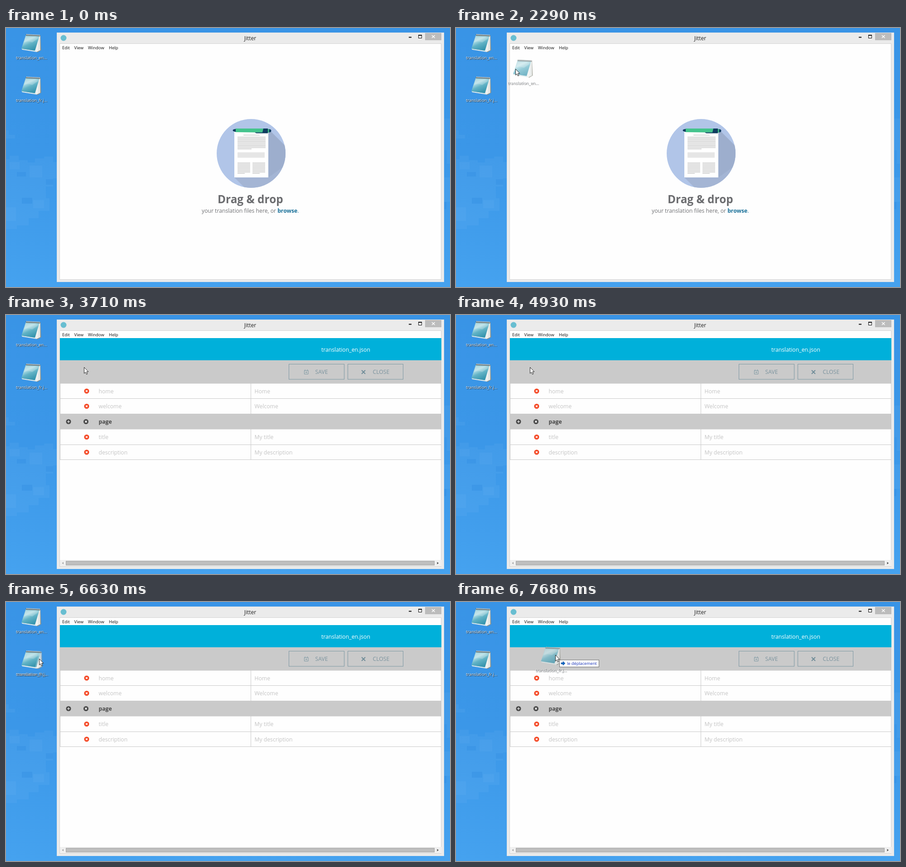
These frames come from a looping animation (980 by 572 pixels, 8000 ms). An HTML page:

```html
<!DOCTYPE html>
<html lang="en">
<head>
<meta charset="utf-8">
<title>Drag and drop</title>
<style>
html, body { margin: 0; width: 100%; height: 100%; overflow: hidden; background: #3f9aea; }
svg { display: block; font-family: "Open Sans", "Noto Sans", sans-serif; }
text { white-space: pre; }
</style>
</head>
<body>
<svg id="stage" width="980" height="572" viewBox="0 0 980 572" xmlns="http://www.w3.org/2000/svg">
<defs>
  <linearGradient id="sky" x2="0" y2="1">
    <stop stop-color="#3994e6"/><stop offset=".5" stop-color="#3b97e8"/><stop offset="1" stop-color="#45a2ef"/>
  </linearGradient>
  <linearGradient id="cover" x1="0" y1="0" x2=".5" y2="1">
    <stop stop-color="#8cc3ce"/><stop offset=".4" stop-color="#b5dfe6"/><stop offset=".65" stop-color="#62b3c6"/><stop offset="1" stop-color="#3795ae"/>
  </linearGradient>
  <clipPath id="disc"><circle cx="541" cy="277" r="76"/></clipPath>
  <clipPath id="view"><rect x="119" y="35" width="842" height="520"/></clipPath>
  <g id="pad">
    <path d="M46 14L76 16 77.500 49 69 54Z" fill="#8d8f83"/>
    <path d="M72 18L75.500 18 75.500 49 67 53 62 49Z" fill="#eef1f0"/>
    <path d="M73 24L72 50M75 20V49" stroke="#c3cac9" stroke-width=".7"/>
    <path d="M34 45.500L64 50 67.500 53 36 48Z" fill="#dce8ea"/>
    <path d="M44 15L74 17 64 50 34 45.500Z" fill="url(#cover)"/>
    <path d="M43 19L72 22 58 32Q48 27 41 32Z" fill="#fff" opacity=".2"/>
    <path d="M44 15.500L75 17" stroke="#59686c" stroke-width="3"/>
    <path d="M45 14.500L75 16" stroke="#dadfdd" stroke-width="2.500" stroke-dasharray="1.500 1.300"/>
  </g>
  <g id="cross"><circle r="5.500"/><path d="M-2 -2L2 2M2 -2L-2 2" stroke="#fff" stroke-width="1.700"/></g>
</defs>

<rect width="980" height="572" fill="url(#sky)"/>
<g id="blocks" fill="#fff"></g>
<g id="icons"></g>

<rect x="112" y="10" width="855" height="551" fill="#ebebeb"/>
<rect x="112.500" y="10.500" width="854" height="550" fill="none" stroke="#dfe3e7"/>
<rect x="118.500" y="34.500" width="842" height="521" fill="#fefefe" stroke="#d3d3d3"/>
<circle cx="127" cy="22" r="6.500" fill="#68bed1"/>
<text x="539" y="27" font-size="12" text-anchor="middle" fill="#222">Jitter</text>
<path d="M889 20.500H895" stroke="#111" stroke-width="2"/>
<path d="M910.500 16V22.500H917.500V16" fill="none" stroke="#111"/><path d="M910 16H918" stroke="#111" stroke-width="2"/>
<rect x="925" y="11" width="36" height="16" fill="#bcbcbc"/>
<path d="M940 16L946.500 22M946.500 16L940 22" stroke="#fff" stroke-width="1.500"/>
<g font-size="9.500" fill="#111">
  <text x="124" y="46.500">Edit</text><text x="150.500" y="46.500">View</text>
  <text x="181" y="46.500">Window</text><text x="227" y="46.500">Help</text>
</g>

<g id="drop">
  <circle cx="541" cy="277" r="76" fill="#b1c5e8"/>
  <g clip-path="url(#disc)"><path d="M579 230L585 229 660 304V410H584L504 330Z" fill="#a4b5d4"/>
  <path d="M579 230L585 229 622 266V300L579 330Z" fill="#98a9c9" opacity=".55"/></g>
  <path d="M504 228H579V330H504Z" fill="#fff"/>
  <g id="print" stroke="#c9c9c9" stroke-width="1.500"></g>
  <rect x="511" y="274.500" width="60" height="12" fill="#e6e6e6"/>
  <path d="M508 222.500L502 224Q499 226 502 228L508 230Z" fill="#0f3c5f"/>
  <path d="M507 222H578V231L507 230Z" fill="#44c48d"/>
  <path d="M568 222H578V232.500H553Q549 231.500 550 230.500H566Z" fill="#0f3c5f"/>
  <path d="M578 223L584 224Q587 227 584 230L578 231Z" fill="#0f3c5f"/>
  <path d="M578 223L580.500 223.500V230.500L578 231Z" fill="#44c48d"/>
  <text x="467" y="387" font-size="24.400" font-weight="700" fill="#6c6d70">Drag &amp; drop</text>
  <text x="432" y="407.500" font-size="12.200" fill="#707174">your translation files here, or <tspan font-weight="700" fill="#176f98">browse</tspan><tspan fill="#176f98">.</tspan></text>
  <rect id="frame" fill="none" stroke="#00b0da"/>
</g>

<g id="editor" font-size="12.200" clip-path="url(#view)">
  <rect x="119" y="51" width="842" height="49" fill="#00b0da"/>
  <text x="696" y="80.500" fill="#fff">translation_en.json</text>
  <rect x="119" y="100" width="842" height="51.500" fill="#cacaca"/>
  <g fill="none" stroke="#7d98a3">
    <rect x="624.500" y="108.500" width="122" height="33.500"/><rect x="754.500" y="108.500" width="122" height="33.500"/>
    <path d="M658.500 122.500H667V130.500H658.500ZM660 122V120.500M665.500 122V120.500M661 126.500H664.500M662.750 124.750V128.250"/>
    <path d="M785 122L793 130M793 122L785 130" stroke="#6f8c98" stroke-width="2"/>
  </g>
  <g fill="#7b939e"><text x="682.500" y="130">SAVE</text><text x="809.500" y="130">CLOSE</text></g>
  <g id="rows"></g>
  <rect x="119" y="218" width="842" height="34.500" fill="#cacaca"/>
  <path d="M119 184.500H961M119 286.500H961M119 319.500H961M119.500 151V319M540.500 151V218M540.500 252V319" stroke="#c9c9c9"/>
  <g fill="#474747"><circle cx="138" cy="235.500" r="5.500"/><use href="#cross" x="176.500" y="235.500"/></g>
  <path d="M135 235.500H141M138 232.500V238.500" stroke="#ddd" stroke-width="1.500"/>
  <text x="204.500" y="240" font-weight="700" fill="#474747">page</text>
  <rect x="119" y="541" width="842" height="14" fill="#f0f0f0"/>
  <rect x="132.500" y="543.500" width="813" height="9" fill="#bebebe" stroke="#a6a6a6"/>
  <path d="M127 545.500V550.500L123.500 548Z" fill="#a5a5a5"/><path d="M951.500 545.500V550.500L955 548Z" fill="#444"/>
</g>

<g id="ghosts" opacity=".68"></g>
<g id="tip">
  <rect x=".5" y=".5" width="87" height="15.500" fill="#fff" stroke="#6c6c6c"/>
  <path d="M4 6.500H8V3.500L13 8 8 12.500V9.500H4Z" fill="#1268c6" stroke="#0a3f86" stroke-width=".6"/>
  <text x="17" y="11.800" font-size="9.200" fill="#1530b8">le déplacement</text>
</g>
<path id="cursor" d="M.5 .5V14L3.500 11.200 5.700 16 7.900 15 5.800 10.300H9.800Z" fill="#fff" stroke="#111" stroke-width=".9"/>
</svg>
<script>
const $ = id => document.getElementById(id);
const LOOP = 8000;
const ENTER = 2440, OPEN = 3710;

const files = [
  { label: 'translation_en...', y: 0, press: [35, 32], lead: [4, 2], tip: [43, 42], hover: [270, 1690], tipFrom: 2440, end: OPEN,
    drag: [[1690, 4, 0], [1810, 13, 6], [1930, 29, 16], [2050, 48, 28], [2170, 70, 42], [2290, 92, 56],
           [2440, 115, 70], [2560, 130, 79], [2710, 137, 83]] },
  { label: 'translation_fr.j...', y: 94, press: [65, 125], lead: [5, 0], tip: [74.500, 136], hover: [5490, 6630], tipFrom: 7170, end: LOOP,
    drag: [[6630, 3, 0], [6780, 9, 0], [6900, 20, 0], [7020, 35, -1], [7170, 64, -4],
           [7290, 95, -6], [7440, 119, -7], [7560, 140, -8], [7680, 153.500, -8.500]] }
];

// free pointer moves: time, x, y
const moves = [
  [150, 0, 40], [270, 19, 35], [400, 30, 32], [550, 33, 32], [670, 35, 32],
  [OPEN, 172, 115], [4930, 163, 115], [5080, 148, 115], [5210, 124, 115],
  [5360, 106, 118], [5490, 88, 122], [5640, 71, 125], [5790, 65, 125]
];

const label = f => [['#000', 1, 1, .75], ['#123', .3, .8, .6], ['#fff', 0, 0, 1]].map(([c, dx, dy, o]) =>
  `<text x="${22 + dx}" y="${68.500 + dy}" font-size="9.200" fill="${c}" opacity="${o}">${f.label}</text>`).join('');
const icon = f => `<use href="#pad"/>${label(f)}`;

files.forEach((f, i) => {
  $('icons').innerHTML += `<g transform="translate(0 ${f.y})"><rect id="hover${i}" x="19.500" y="8.500" width="74" height="63"
    fill="#fff" fill-opacity=".3" stroke="#fff" stroke-opacity=".4"/>${icon(f)}</g>`;
  $('ghosts').innerHTML += `<g id="ghost${i}">${icon(f)}</g>`;
});

const line = (x1, x2, y) => `<path d="M${x1} ${y}H${x2}"/>`;
let print = line(524, 560, 236.500);
for (let k = 0; k < 10; k++) print += line(511, k == 9 ? 542 : 573, 241 + k * 2.900);
for (const x of [511, 544])
  for (let k = 0; k < 9; k++) print += line(x, x + (k == 8 ? 16 : 28), 298 + k * 2.900);
$('print').innerHTML = print;

$('rows').innerHTML = [['home', 'Home', 168], ['welcome', 'Welcome', 201.500], ['title', 'My title', 269.500], ['description', 'My description', 303]]
  .map(([key, val, y]) => `<use href="#cross" x="178" y="${y}" fill="#f4431f"/>
    <g fill="#c4c4c4"><text x="204.500" y="${y + 4.500}">${key}</text><text x="548.500" y="${y + 4.500}">${val}</text></g>`).join('');

// faint mosaic of the wallpaper
$('blocks').innerHTML = `<path opacity=".035" d="M0 290H8V282H28V292H48V297H64V288H84V284H104V296H112V332H104V350H88V376H96V404H72V420H50V436H24V444H0Z"/>
  <path opacity=".035" d="M0 226H6V236H20V244H0ZM967 200H980V300H973V270H967ZM967 330H980V384H967Z"/>
  <path opacity=".03" d="M8 296H30V312H8ZM52 304H80V330H52ZM0 396H22V426H0ZM60 380H84V398H60Z"/>
  <path fill="#2d88dc" opacity=".3" d="M35 375H58V388H35ZM88 334H104V346H88ZM24 318H44V328H24ZM967 384H972V400H967Z"/>`;

const last = (list, t) => list.filter(k => k[0] <= t).pop();
const show = (el, on) => el.setAttribute('display', on ? 'inline' : 'none');
const place = (el, x, y) => el.setAttribute('transform', `translate(${x} ${y})`);

function draw(t) {
  let pos = last(moves, t), tip = false;
  let at = pos && [pos[1], pos[2]];

  files.forEach((f, i) => {
    const step = t < f.end && last(f.drag, t), ghost = $('ghost' + i);
    show($('hover' + i), t >= f.hover[0] && t < f.hover[1]);
    show(ghost, step);
    if (!step) return;
    const [, dx, dy] = step;
    const rest = step == f.drag[f.drag.length - 1];
    place(ghost, dx, f.y + dy);
    at = [f.press[0] + dx + (rest ? 0.500 : f.lead[0]), f.press[1] + dy + (rest ? 0 : f.lead[1])];
    tip = t >= f.tipFrom;
    if (tip) place($('tip'), f.tip[0] + dx, f.tip[1] + dy);
  });

  show($('tip'), tip);
  show($('cursor'), at);
  if (at) place($('cursor'), ...at);
  show($('drop'), t < OPEN);
  show($('editor'), t >= OPEN);

  const w = t < 2560 ? 4 : t < 2710 ? 7 : 8, frame = $('frame');
  show(frame, t >= ENTER);
  const box = { x: 119 + w / 2, y: 51.500 + w / 2, width: 841 - w, height: 503.500 - w, 'stroke-width': w };
  for (const k in box) frame.setAttribute(k, box[k]);
}

function tick() {
  draw(performance.now() % LOOP);
  requestAnimationFrame(tick);
}
tick();
</script>
</body>
</html>
```
